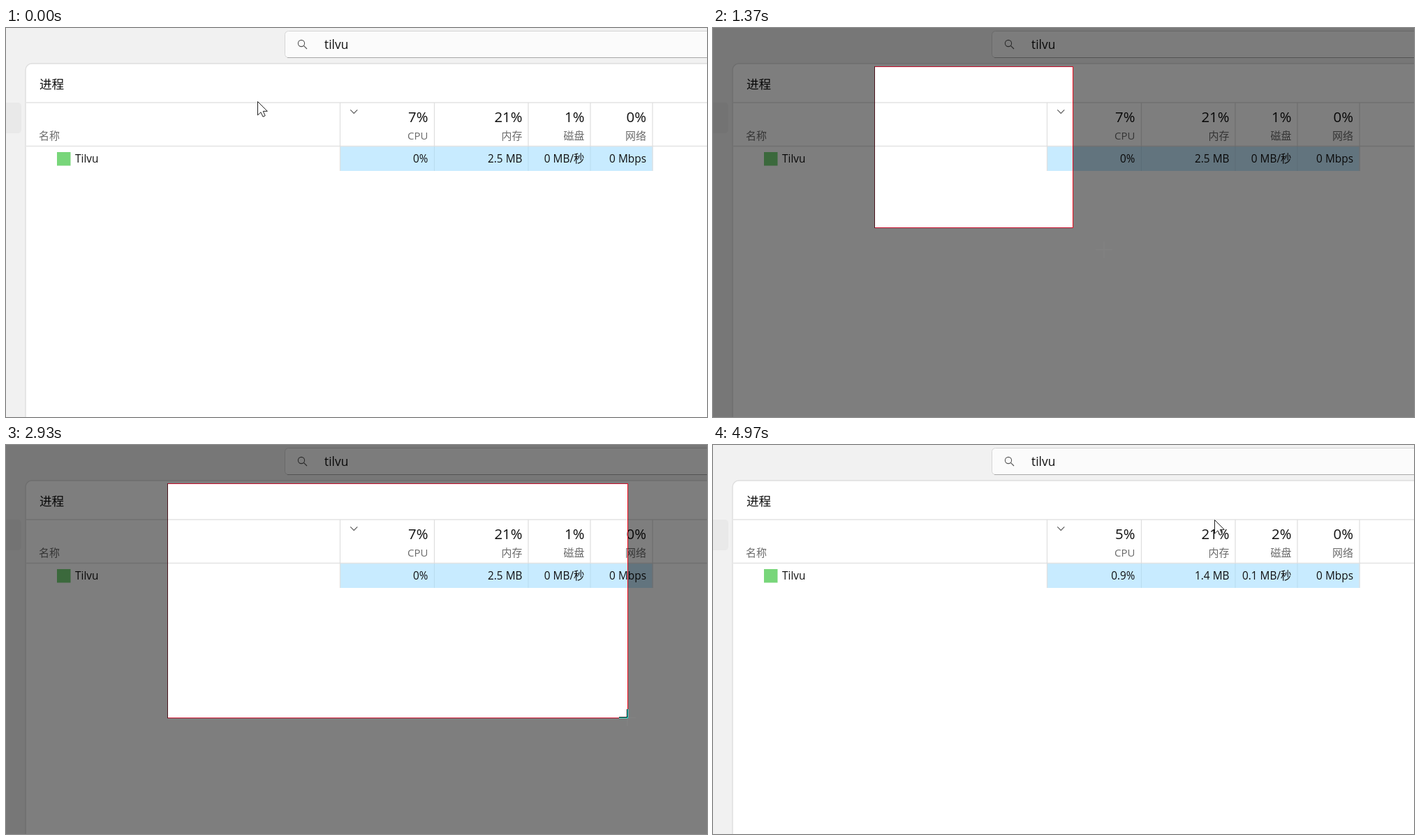
These frames come from a looping animation (1004 by 558 pixels, 5 s). An HTML page:

```html
<!DOCTYPE html>
<html lang="zh-CN">
<head>
<meta charset="utf-8">
<title>进程</title>
<style>
html, body { margin: 0; width: 100%; height: 100%; overflow: hidden; background: #f1f1f1; }
svg { display: block; width: 100%; height: 100%; }
text { font: 15.4px "Open Sans", "Noto Sans CJK SC", "Noto Sans CJK", sans-serif; fill: #111; }
.end text { text-anchor: end; }
.end .big { font-size: 20.4px; }
text.dim { font-size: 15px; fill: #6b6b6b; }
.thin { fill: none; stroke: #555; stroke-width: 1.1; }
#cross { mix-blend-mode: difference; }
</style>
</head>
<body>
<svg viewBox="0 0 1004 558" preserveAspectRatio="none">
  <rect width="1004" height="558" fill="#f1f1f1"/>
  <rect x="-8" y="107" width="30" height="44" rx="5" fill="#e9e9e9"/>

  <rect x="399.5" y="4.5" width="640" height="38" rx="5" fill="#fbfbfb" stroke="#d6d6d6"/>
  <path d="M403 42.5H1004" stroke="#a8a8a8"/>
  <circle class="thin" cx="423" cy="22" r="4.6"/>
  <path class="thin" d="M426.4 25.4L431 30"/>
  <text x="456" y="30" style="font-size:17.4px">tilvu</text>

  <rect x="28" y="51" width="1000" height="540" rx="9" fill="#fff" stroke="#dedede" stroke-width="1.4"/>
  <text x="48" y="87" style="font-size:17.6px;font-weight:500">进程</text>
  <text class="dim" x="47" y="160">名称</text>
  <rect x="479" y="170" width="447.5" height="35" fill="#c8ebff"/>
  <rect id="hot" x="479" y="170" width="134" height="35" fill="#88d8ff"/>
  <path d="M29 107H1004M29 169.5H1004" stroke="#e3e3e3" stroke-width="1.5"/>
  <path d="M478.5 107V205M613.5 107V170M748 107V170M837 107V170M926 107V205" stroke="#dedede" stroke-width="1.2"/>
  <path d="M613.5 170V205M748 170V205M837 170V205" stroke="#b9dcef"/>
  <path class="thin" d="M493.3 117.4L498.3 122.4L503.3 117.4"/>
  <path class="thin" id="fold" d="M52.5 181.8L58 187L52.5 192.2"/>
  <rect x="73" y="178" width="19.5" height="19.5" fill="#78d67a"/>
  <text x="99" y="193">Tilvu</text>
  <g class="end" id="cols"></g>

  <g id="shade">
    <path id="mask" fill-rule="evenodd" opacity=".505"/>
    <g id="frame">
      <path id="level" stroke="#c8102e" fill="none"/>
      <path id="left" stroke="#4a141c"/>
      <path id="right"/>
    </g>
  </g>
  <path id="cross" d="M-12 0H12M0 -12V12" stroke="#fff" stroke-width="2"/>
  <path id="arrow" d="M.5 .5V20L5 15.8L8 22.3L11.2 20.8L8.3 14.4H14.3Z" fill="#fff" stroke="#222"/>
</svg>
<script>
const $ = id => document.getElementById(id);
const set = (id, name, value) => $(id).setAttribute(name, value);
const show = (id, on) => $(id).style.display = on ? '' : 'none';

const LOOP = 5000, DIM = 200, DRAG = 850, LAG = 60, UNDIM = 3080, REFRESH = 4400;
const X0 = 231, Y0 = 55;

// Pointer path: time, x, y
const path = [
  [0, 360, 105], [30, 360, 105], [430, 318, 80], [750, 231, 55], [DRAG, 231, 55],
  [1010, 290, 110], [1310, 515, 286], [1370, 560, 318], [1540, 645, 366],
  [1710, 726, 378], [1770, 755, 383], [2070, 890, 391], [3300, 890, 391],
  [3700, 876, 388], [4000, 876, 388], [4300, 868, 360], [4820, 790, 241],
  [4970, 718, 107], [LOOP, 718, 107]
];

function pointer(t) {
  const i = path.findIndex(p => p[0] > t);
  const [ta, xa, ya] = path[i - 1], [tb, xb, yb] = path[i];
  const k = (t - ta) / (tb - ta);
  return [Math.round(xa + (xb - xa) * k), Math.round(ya + (yb - ya) * k)];
}

// Per column: right edge, label
const columns = [[604.5, 'CPU'], [739.5, '内存'], [828.5, '磁盘'], [917, '网络']];
const idle = [['7%', '0%'], ['21%', '2.5 MB'], ['1%', '0 MB/秒'], ['0%', '0 Mbps']];
const busy = [['12%', '5.1%'], ['21%', '37.2 MB'], ['2%', '0 MB/秒'], ['0%', '0 Mbps']];
const done = [['5%', '0.9%'], ['21%', '1.4 MB'], ['2%', '0.1 MB/秒'], ['0%', '0 Mbps']];

$('cols').innerHTML = columns.map(([x, label]) =>
  `<text class="big" x="${x}" y="135"></text><text class="dim" x="${x}" y="160">${label}</text>` +
  `<text class="cell" x="${x}" y="193"></text>`).join('');
const totals = document.querySelectorAll('.big'), cells = document.querySelectorAll('.cell');

function drawSelection(t) {
  const active = t - LAG > DRAG;
  const stage = 'M0 0H1004V558H0Z';
  show('frame', active);
  if (!active) return set('mask', 'd', stage);
  const [x, y] = pointer(t - LAG);
  set('mask', 'd', `${stage}M${X0} ${Y0}H${x + 1}V${y + 1}H${X0}Z`);
  set('level', 'd', `M${X0} ${Y0 + .5}H${x + 1}M${X0} ${y + .5}H${x + 1}`);
  set('left', 'd', `M${X0 + .5} ${Y0}V${y + 1}`);
  set('right', 'd', `M${x + .5} ${Y0}V${y + 1}`);
  // Scaled screen pixels darken every fifth column
  set('right', 'stroke', x % 5 === 1 ? '#4a141c' : '#f01020');
}

function draw(now) {
  const step = Math.floor((now % LOOP + 4) * .03) % 150;
  const t = Math.round(step * 10 / 3) * 10;
  const shaded = t >= DIM && t < UNDIM;
  const data = t < UNDIM ? idle : t < REFRESH ? busy : done;
  data.forEach(([total, cell], i) => {
    totals[i].textContent = total;
    cells[i].textContent = cell;
  });
  show('hot', data === busy);
  show('fold', data === busy);
  show('shade', shaded);
  show('cross', shaded);
  show('arrow', !shaded);
  if (shaded) drawSelection(t);
  set(shaded ? 'cross' : 'arrow', 'transform', `translate(${pointer(t)})`);
  requestAnimationFrame(draw);
}
draw(performance.now());
</script>
</body>
</html>
```
